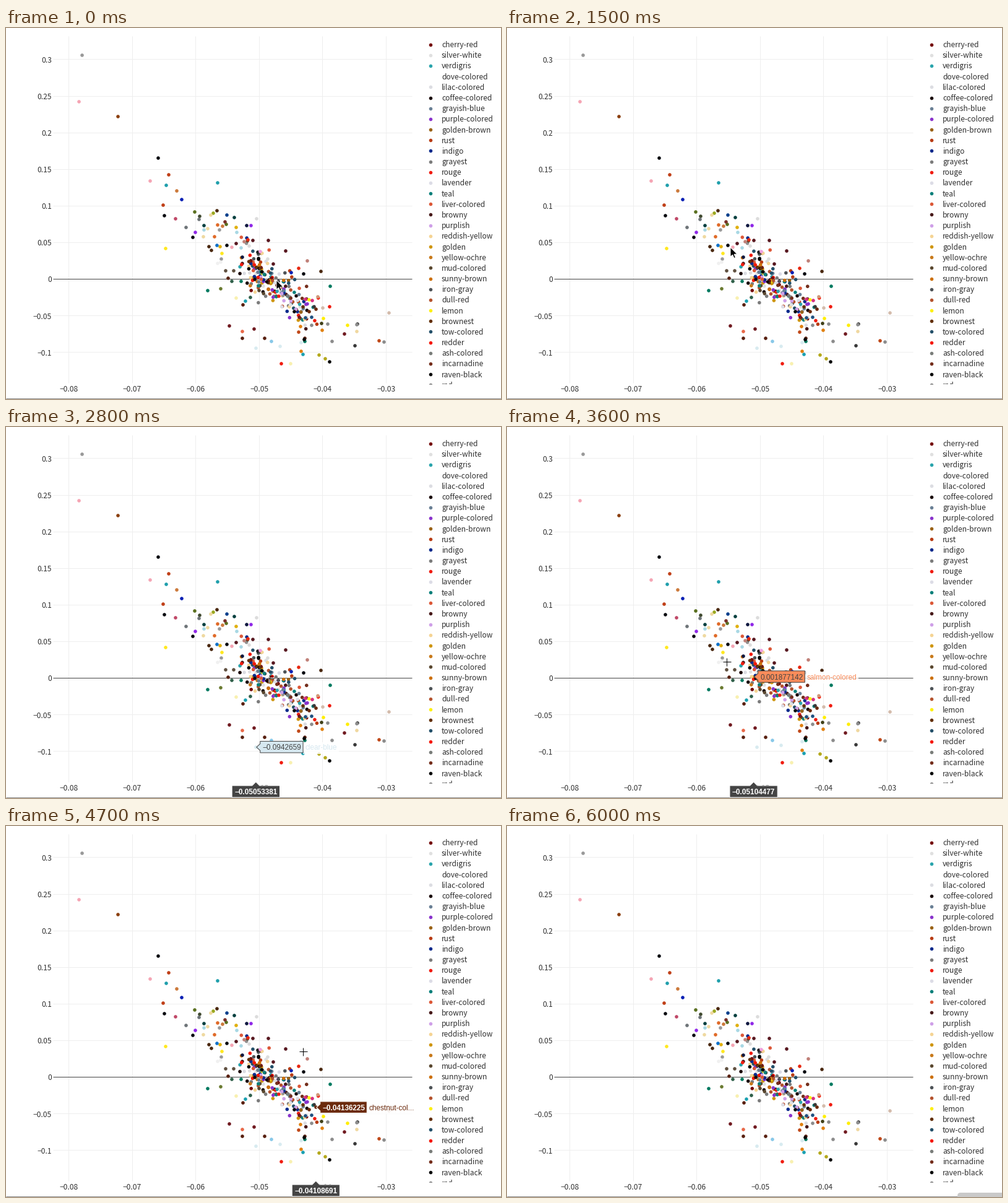
Animation of 800x599 px, one loop 6100 ms. Source, as a matplotlib script:

```python
import numpy as np
import matplotlib.pyplot as plt
from matplotlib.animation import FuncAnimation
from matplotlib.patches import FancyBboxPatch, Polygon, Rectangle

W, H, DPI = 800, 599, 100
FRAMES, STEP = 61, 100
PX = 72 / DPI                      # points per pixel
UI, HOVER = "Noto Sans CJK JP", "Liberation Sans"
INK, TEXT = "#444444", "#303030"

LEGEND = [
    ("cherry-red", "#750b0b"), ("silver-white", "#e0e0e0"),
    ("verdigris", "#2aa4ac"), ("dove-colored", "#ffffff"),
    ("lilac-colored", "#dcdde2"), ("coffee-colored", "#1a0a0a"),
    ("grayish-blue", "#6a8095"), ("purple-colored", "#8a33cc"),
    ("golden-brown", "#9a6318"), ("rust", "#b83c14"),
    ("indigo", "#0a2a8c"), ("grayest", "#7c7c7c"),
    ("rouge", "#f01c10"), ("lavender", "#dcdce6"),
    ("teal", "#08807a"), ("liver-colored", "#dc5838"),
    ("browny", "#481a1a"), ("purplish", "#cfa0e8"),
    ("reddish-yellow", "#f5d494"), ("golden", "#cf9610"),
    ("yellow-ochre", "#c87a1c"), ("mud-colored", "#5a4830"),
    ("sunny-brown", "#cc700c"), ("iron-gray", "#4e5357"),
    ("dull-red", "#b4532e"), ("lemon", "#fdf012"),
    ("brownest", "#63300a"), ("tow-colored", "#24506a"),
    ("redder", "#f51808"), ("ash-colored", "#7a7d7a"),
    ("incarnadine", "#742e1c"), ("raven-black", "#060606"),
    ("red", "#909090"),
]

# Scatter points in pixels, grouped by colour
UPPER = {
    "#999999": [(123, 44), (345, 326), (348, 373)],
    "#f5a5b4": [(118, 119), (233, 247), (365, 354)],
    "#8b4010": [(181, 143)],
    "#080a10": [(246, 210), (256, 303), (302, 338), (357, 351), (481, 397)],
    "#c04018": [(263, 237), (254, 286)],
    "#1f9fac": [(259, 254), (342, 250)],
    "#cc7a3c": [(276, 263), (350, 320)],
    "#0a20b4": [(284, 277), (461, 395)],
    "#c04868": [(274, 308)],
    "#5a7020": [(305, 297), (356, 317)],
    "#404a30": [(313, 304)],
    "#6e7478": [(312, 309), (291, 322)],
    "#4a2810": [(341, 295), (328, 353), (332, 359), (509, 393)],
    "#9aa820": [(335, 299)],
    "#efd9a0": [(331, 302), (326, 324), (319, 337)],
    "#08408c": [(357, 302)],
    "#06403f": [(369, 306), (320, 319)],
    "#dcdcdc": [(405, 308), (393, 352), (423, 373)],
    "#9028e8": [(306, 330), (396, 319)],
    "#a8d8e4": [(320, 326), (373, 330), (380, 355)],
    "#e06a28": [(342, 318), (337, 337)],
    "#7a3028": [(354, 313)],
    "#e0b010": [(372, 322), (346, 353)],
    "#101840": [(389, 319), (382, 370)],
    "#ffe820": [(258, 356), (349, 364)],
    "#1070c8": [(341, 351)],
    "#f0f0f0": [(342, 380), (347, 378)],
    "#581820": [(372, 348), (399, 343), (424, 343), (452, 360), (432, 381)],
    "#c08078": [(385, 345), (487, 376)],
    "#e82810": [(391, 342), (473, 388)],
    "#202020": [(407, 362)],
    "#f0a0e0": [(411, 361)],
}
LOWER = {
    "#007a60": [(326, 424), (524, 417), (380, 409), (483, 506)],
    "#6a7a30": [(347, 421)],
    "#582010": [(359, 404), (383, 447), (382, 501), (418, 501), (483, 501)],
    "#30604a": [(365, 409), (395, 435)],
    "#605040": [(355, 392), (368, 392)],
    "#f8f0b0": [(372, 436), (460, 542)],
    "#1aa0b0": [(387, 441), (480, 527)],
    "#f01c10": [(523, 450), (445, 542)],
    "#d09878": [(504, 434)],
    "#d4bcac": [(619, 460), (512, 452)],
    "#701a20": [(361, 481), (401, 486), (547, 494), (474, 467)],
    "#e86848": [(382, 490)],
    "#88c8e8": [(429, 506)],
    "#d8ebf0": [(404, 517), (443, 514), (477, 508)],
    "#ffee00": [(552, 480), (513, 469)],
    "#383838": [(568, 478), (564, 513), (498, 450)],
    "#f0d8a0": [(567, 490)],
    "#c04818": [(603, 505), (473, 491)],
    "#8c8c8c": [(611, 507), (527, 506), (520, 478), (494, 480), (567, 479)],
    "#080808": [(523, 539), (482, 503), (466, 458)],
    "#b4a81c": [(506, 528), (516, 534)],
    "#e08010": [(477, 522), (476, 482), (511, 488)],
    "#404018": [(510, 477)],
    "#205080": [(484, 468), (494, 467)],
    "#6b2a0c": [(501, 454), (490, 458)],
    "#d83080": [(495, 440), (484, 438)],
}

# Cursor path: time, x, y
PATH = np.array([
    (0, 437, 407), (700, 405, 388), (1500, 361, 354), (2100, 385, 372),
    (2800, 426, 406), (3200, 405, 420), (3600, 355, 379), (4000, 636, 514),
    (4300, 600, 470), (4700, 480, 364), (5200, 430, 350), (5600, 590, 480),
    (5900, 745, 592),
])
CROSS_FROM, CURSOR_END = 2200, 5800
TAB_FROM = 4900

# Hover labels: start time, x, y, name, fill
LABELS = [
    (2200, -0.05362731, 0.04862915, "mulberry", "#581820"),
    (2400, -0.05273418, 0.03008241, "slate", "#101840"),
    (2600, -0.05192564, 0.05362847, "vermilion", "#e82810"),
    (2800, -0.05053381, -0.0942659, "clear-blue", "#d6e8f0"),
    (2900, -0.04808127, -0.0850261, "sky-blue", "#88c8e8"),
    (3100, -0.04915273, -0.08079317, "maroon", "#582010"),
    (3300, -0.05081216, -0.06814527, "russet", "#701a20"),
    (3600, -0.05104477, 0.001877142, "salmon-colored", "#fa8c5a"),
    (3700, -0.04583235, 0.03849254, "plum", "#581820"),
    (3800, -0.03892613, -0.11294816, "jet-black", "#080808"),
    (3900, -0.03112452, -0.08417315, "copper", "#c04818"),
    (4000, -0.02955174, -0.04613455, "gilt", "#efb898"),
    (4300, -0.03463427, -0.07148836, "straw", "#f0d8a0"),
    (4500, -0.03882416, -0.00972947, "sea-green", "#007a60"),
    (4700, -0.04108691, -0.04136225, "chestnut-col...", "#6b2a0c"),
    (4800, -0.04301352, 0.00719162, "inky", "#080a10"),
    (5000, -0.04583235, 0.03849254, "plum", "#581820"),
    (5200, -0.04856752, 0.05287674, "wine-red", "#581820"),
    (5400, -0.03892613, -0.11294816, "jet-black", "#080808"),
    (5500, -0.03463427, -0.07148836, "straw", "#f0d8a0"),
    (5700, None, None, "", ""),
]

fig = plt.figure(figsize=(W / DPI, H / DPI), dpi=DPI, facecolor="white")
ax = fig.add_axes([0, 0, 1, 1])
ax.set(xlim=(0, W), ylim=(H, 0))
ax.axis("off")


def to_x(v):
    return 409.3 + (v + 0.05) * 10263


def to_y(v):
    return 405.5 - v * 1182


def label(x, y, s, size=12, font=UI, color=TEXT, **kw):
    return ax.text(x, y, s, fontsize=size * PX, family=font, color=color, **kw)


def rule(x, y, color, zorder):
    # Whole coordinates snap to the pixel row or column that starts there
    ax.plot(np.floor(x), np.floor(y), color=color, lw=PX,
            solid_capstyle="butt", zorder=zorder)


def dots(x, y, colors, **kw):
    return ax.scatter(x, y, s=(5.6 * PX) ** 2, c=colors, lw=0, snap=False,
                      **kw)


def number(v):
    return str(v).replace("-", "\u2212")


def draw_grid():
    for v in np.arange(-8, -2) / 100:
        rule([to_x(v)] * 2, [13, 573], "#eeeeee", 1)
        label(to_x(v), 587, number(f"{v:g}"), ha="center")
    for v in np.arange(-2, 7) / 20:
        color, z = (INK, 2) if v == 0 else ("#eeeeee", 1)
        rule([76, 656], [to_y(v)] * 2, color, z)
        label(74, to_y(v) + 5, number(f"{v:g}"), ha="right")
    rule([0, W], [H - 1] * 2, "#8c8c8c", 2)


def draw_points():
    rng = np.random.default_rng(12)
    palette = [c for _, c in LEGEND if c != "#ffffff"]
    xs = rng.triangular(374, 418, 512, 200)
    ys = 404 + 0.68 * (xs - 418) + rng.normal(0, 17, xs.size)
    points = [(x, y, palette[rng.integers(len(palette))])
              for x, y in zip(xs, ys)]
    for group in (UPPER, LOWER):
        points += [(x, y, c) for c, pts in group.items() for x, y in pts]
    dots(*zip(*points), zorder=3)


def draw_legend():
    view = Rectangle((660, 0), 140, 575, transform=ax.transData)
    for i, (name, color) in enumerate(LEGEND):
        y = 26.6 + 17.18 * i
        dot = dots([685.8], [y], color)
        text = label(704, y + 4.5, name, clip_on=True)
        for part in (dot, text):
            part.set_clip_path(view)


draw_grid()
draw_points()
draw_legend()

tab = ax.add_patch(FancyBboxPatch(
    (733, 597), 80, 20, boxstyle="round,pad=5,rounding_size=5",
    fc="#c9c9c9", ec="none", zorder=5))


def shape(zorder, **kw):
    return ax.add_patch(Polygon([(0, 0)], closed=True, lw=PX,
                                zorder=zorder, **kw))


name_text = label(0, 0, "", 11.8, HOVER, zorder=6, bbox=dict(
    fc="white", ec="none", alpha=0.8, boxstyle="square,pad=0.3"))
value_box = shape(7)
value_text = label(0, 0, "", 11.7, HOVER, zorder=8)
axis_box = shape(7, fc=INK, ec="white")
axis_text = label(0, 0, "", 11.7, HOVER, "white", zorder=8, ha="center",
                  weight="bold")
hover = [name_text, value_box, value_text, axis_box, axis_text]

ARROW = np.array([(0, 0), (0, 15.5), (3.6, 12.2), (6, 17.6), (8.4, 16.6),
                  (6.1, 11.3), (11, 11.1)])
arrow = shape(10, fc="black", ec="white")
cross = [ax.plot([], [], color=c, lw=w * PX, zorder=z,
                 solid_capstyle="butt")[0]
         for c, w, z in [("white", 2.4, 9), ("black", 1, 10)]]


def width(text):
    return text.get_window_extent(fig.canvas.get_renderer()).width


def is_light(color):
    rgb = [int(color[i:i + 2], 16) for i in (1, 3, 5)]
    return np.dot(rgb, (0.299, 0.587, 0.114)) > 128


def show_hover(t):
    active = [row for row in LABELS if row[0] <= t]
    shown = bool(active) and active[-1][1] is not None
    for part in hover:
        part.set_visible(shown)
    if not shown:
        return
    _, vx, vy, name, fill = active[-1]
    x, y = to_x(vx), to_y(vy)
    light = is_light(fill)
    edge = INK if light else "white"

    left = x + 7
    value_text.set(text=number(vy), position=(left + 3.5, y + 4.3),
                   color=edge, weight="normal" if light else "bold")
    right = left + width(value_text) + 6.5
    value_box.set_xy([(x + 1, y), (left, y - 5.5), (left, y - 9.5),
                      (right, y - 9.5), (right, y + 9), (left, y + 9),
                      (left, y + 5.5)])
    value_box.set(facecolor=fill, edgecolor=edge)
    name_text.set(text=name, position=(right + 3, y + 4.3), color=fill)

    axis_text.set(text=number(vx), position=(x, 593.3))
    half = width(axis_text) / 2 + 4
    axis_box.set_xy([(x, 573), (x + 6, 579), (x + half, 579),
                     (x + half, 598), (x - half, 598), (x - half, 579),
                     (x - 6, 579)])


def show_cursor(t):
    x, y = (np.interp(t, PATH[:, 0], PATH[:, k]) for k in (1, 2))
    pointing = t < CROSS_FROM
    arrow.set_visible(pointing)
    arrow.set_xy(ARROW + (x, y))
    for part in cross:
        part.set_visible(not pointing and t < CURSOR_END)
        part.set_data([x - 6.5, x + 6.5, np.nan, x, x],
                      [y, y, np.nan, y - 6.5, y + 6.5])


def update(i):
    t = i * STEP
    show_hover(t)
    show_cursor(t)
    tab.set_visible(t >= TAB_FROM)
    return [*hover, arrow, *cross, tab]


anim = FuncAnimation(fig, update, frames=FRAMES, interval=STEP,
                     init_func=lambda: update(0), repeat=True, repeat_delay=0)
plt.show()
```
